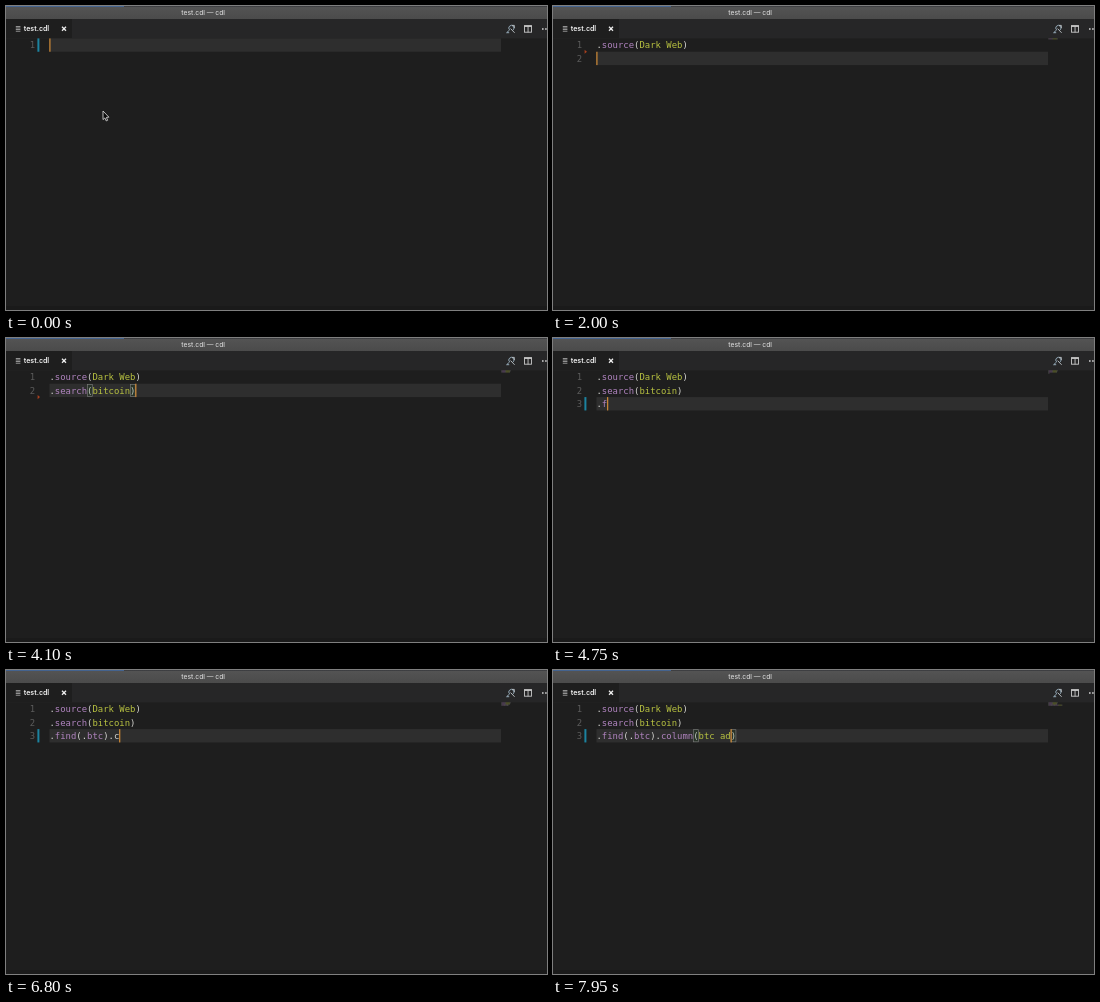
Write an HTML page with a canvas that moves like this. It is 541x304 px and loops after 8000 ms.

```html
<!DOCTYPE html>
<html lang="en">
<head>
<meta charset="utf-8">
<title>test.cdl</title>
<style>
html, body { margin: 0; width: 100%; height: 100%; overflow: hidden; background: #1e1e1e; }
canvas { display: block; width: 541px; height: 304px; }
</style>
</head>
<body>
<canvas id="stage"></canvas>
<script>
const W = 541, H = 304, LOOP = 8000;
const LEFT = 43.5, TOP = 32.4, CHAR = 5.37, LINE = 13.35;
const MONO = '8.92px "DejaVu Sans Mono", monospace';
const UI = 'Inter, sans-serif';
const COLOR = { plain: '#d6d6d2', name: '#b184c0', arg: '#b9c341', caret: '#d08a36' };
const FINISHED = ['.source(Dark Web)', '.search(bitcoin)'];

const canvas = document.getElementById('stage');
const ctx = canvas.getContext('2d');
const ratio = window.devicePixelRatio || 1;
canvas.width = W * ratio;
canvas.height = H * ratio;

const lineTop = row => TOP + row * LINE;
const colX = col => LEFT + col * CHAR;

// Editing steps: each holds the current line and where the caret is.
const steps = [];
const put = (t, row, text, caret = text.length, sel = null) =>
  steps.push({ t, row, text, caret, sel });

function placeholder(t, row, before, word) {
  put(t, row, before + word + ')', before.length, [before.length, before.length + word.length]);
}

function fill(row, before, word, times) {
  times.forEach((t, i) => {
    const typed = before + word.slice(0, i + 1);
    put(t, row, typed + ')', typed.length);
  });
}

const every = (start, gap, count) => Array.from({ length: count }, (_, i) => start + i * gap);

put(-450, 0, '');
put(200, 0, '.');
put(350, 0, '.s');
placeholder(1000, 0, '.source(', 'SourceNames');
fill(0, '.source(', 'Dark Web', every(1150, 70, 8));
put(1750, 0, '.source(Dark Web)');
put(1950, 1, '');
put(2050, 1, '.');
put(2150, 1, '.s');
placeholder(2900, 1, '.search(', 'Query');
fill(1, '.search(', 'bitcoin', every(3100, 90, 7));
put(3850, 1, '.search(bitcoin)');
put(4300, 2, '');
put(4500, 2, '.');
put(4650, 2, '.f');
placeholder(5450, 2, '.find(', 'Pattern');
fill(2, '.find(', '.btc', every(5800, 150, 4));
put(6450, 2, '.find(.btc)');
put(6650, 2, '.find(.btc).');
put(6800, 2, '.find(.btc).c');
placeholder(7100, 2, '.find(.btc).column(', 'Name');
fill(2, '.find(.btc).column(', 'btc ad', [7350, 7450, 7550, 7650, 7750, 7850]);

const marks = [
  { t: 0, row: 0, bar: true },
  { t: 1800, row: 0 },
  { t: 2250, row: 1, bar: true },
  { t: 3900, row: 1 },
  { t: 4650, row: 2, bar: true }
];

// Completion lists; a leading "*" marks a plain word entry.
const S_ITEMS = ['search', 'showDate', 'showRanges', 'source'];
const S_WORDS = ['search', 'showDate', 'showRanges', '*source', 'source'];
const F_ITEMS = ['filter', 'find'];
const SOURCE_DOC = ['Select data source(s).'];
const FILTER_DOC = ['Filter the results by field.', 'Use the field name first,', 'then the value.'];
const COLUMN_DOC = ['Add a column to the results.', 'Use the column name as', 'the argument.'];
const menus = [
  { t: 0 },
  { t: 450, row: 0, col: 2, items: S_ITEMS, sel: 0 },
  { t: 650, row: 0, col: 2, items: S_ITEMS, sel: 1 },
  { t: 700, row: 0, col: 2, items: S_ITEMS, sel: 2 },
  { t: 750, row: 0, col: 2, items: S_ITEMS, sel: 3 },
  { t: 850, row: 0, col: 2, items: S_ITEMS, sel: 3, doc: SOURCE_DOC },
  { t: 1000 },
  { t: 2300, row: 1, col: 2, items: S_WORDS, sel: 0, doc: SOURCE_DOC },
  { t: 2900 },
  { t: 4800, row: 2, col: 2, items: F_ITEMS, sel: 0, doc: FILTER_DOC },
  { t: 5250, row: 2, col: 2, items: F_ITEMS, sel: 1, doc: ['Find a pattern.'] },
  { t: 5450 },
  { t: 6900, row: 2, col: 13, items: ['column', 'count'], sel: 0, doc: COLUMN_DOC },
  { t: 7100 }
];

const latest = (list, t) => list.reduce((found, item) => item.t <= t ? item : found, list[0]);

function rect(x, y, w, h, color) {
  ctx.fillStyle = color;
  ctx.fillRect(x, y, w, h);
}

function outline(x, y, w, h, color, width = 0.7) {
  ctx.strokeStyle = color;
  ctx.lineWidth = width;
  ctx.strokeRect(x, y, w, h);
}

function label(text, x, y, font, color, align = 'left') {
  ctx.font = font;
  ctx.fillStyle = color;
  ctx.textAlign = align;
  ctx.fillText(text, x, y);
}

function stroke(points, color, width) {
  ctx.beginPath();
  points.forEach(([x, y], i) => i ? ctx.lineTo(x, y) : ctx.moveTo(x, y));
  ctx.strokeStyle = color;
  ctx.lineWidth = width;
  ctx.stroke();
}

function cross(x, y, r, color, width) {
  stroke([[x - r, y - r], [x + r, y + r]], color, width);
  stroke([[x + r, y - r], [x - r, y + r]], color, width);
}

function drawFrame() {
  rect(0, 0, W, H, '#1e1e1e');
  const bar = ctx.createLinearGradient(0, 0, 0, 13);
  bar.addColorStop(0, '#545454');
  bar.addColorStop(1, '#4b4b4b');
  rect(0, 0, W, 13, bar);
  rect(0, 0, W, 0.9, '#3b3d40');
  rect(0, 0, 118, 1, '#44638f');
  label('test.cdl — cdl', 175.3, 9.1, '500 6.7px ' + UI, '#d2d2d2');

  rect(0, 13, W, 19.4, '#262627');
  rect(0, 13, 66, 19.4, '#1e1e1e');
  for (let i = 0; i < 4; i++) rect(9.8, 20 + i * 1.6, 4.6, 0.75, '#b9b9b9');
  label('test.cdl', 17.8, 25.2, '600 7px ' + UI, '#f4f4f4');
  cross(58, 22.8, 2, '#f0f0f0', 1.3);

  // Toolbar
  ctx.beginPath();
  ctx.arc(505.4, 22, 2.6, Math.PI * 0.75, Math.PI * 2.3);
  ctx.strokeStyle = '#9fb6c4';
  ctx.lineWidth = 0.9;
  ctx.stroke();
  stroke([[504.6, 22.6], [508.6, 26.8]], '#c2c8cc', 0.9);
  stroke([[503.6, 24], [500.6, 26.7], [503.2, 26.7]], '#9fb6c4', 0.9);
  stroke([[506, 19.4], [508.3, 19.4], [508.3, 22]], '#c2c8cc', 0.9);
  outline(518.5, 19.8, 7, 6.4, '#c8c8c8', 0.9);
  rect(518.1, 19.3, 7.8, 1.6, '#c8c8c8');
  rect(521.6, 20, 0.9, 6.4, '#c8c8c8');
  for (const x of [536, 539.1]) rect(x, 22.2, 1.6, 1.6, '#c8c8c8');
  rect(0, 300, W, 4, '#1a1a1a');
}

function tokens(text) {
  return [...text.matchAll(/(\.)(\w+)|[().]|[^().]+/g)].flatMap(m => {
    if (m[2]) {
      const fresh = m[2] === 'c';
      return [['.', m.index, COLOR.plain], [m[2], m.index + 1, fresh ? COLOR.plain : COLOR.name]];
    }
    return [[m[0], m.index, /[().]/.test(m[0]) ? COLOR.plain : COLOR.arg]];
  });
}

function drawLine(text, row) {
  const y = lineTop(row);
  label(String(row + 1), 29, y + 10, MONO, '#5c5c5c', 'right');
  for (const [part, col, color] of tokens(text)) {
    label(part, colX(col), y + 10, MONO, color);
    ctx.globalAlpha = 0.45;
    rect(495.5 + col * 0.53, 32.5 + row * 1.1, part.length * 0.53, 0.8, color);
    ctx.globalAlpha = 1;
  }
}

function drawBrackets(step) {
  const { text, caret, row } = step;
  const close = text[caret] === ')' ? caret : text[caret - 1] === ')' ? caret - 1 : -1;
  if (close < 0) return;
  for (const col of [text.lastIndexOf('(', close), close]) {
    rect(colX(col), lineTop(row) + 0.4, CHAR, LINE - 1, 'rgba(0,100,0,0.1)');
    outline(colX(col) + 0.3, lineTop(row) + 0.6, CHAR - 0.5, LINE - 1.2, '#808080', 0.6);
  }
}

function drawMark({ row, bar }) {
  if (bar) return rect(31.4, lineTop(row), 2, LINE, '#1c83a0');
  const y = lineTop(row + 1);
  ctx.beginPath();
  ctx.moveTo(31.6, y - 2.1);
  ctx.lineTo(34, y);
  ctx.lineTo(31.6, y + 2.1);
  ctx.fillStyle = '#a8401f';
  ctx.fill();
}

function drawEditor(t) {
  const step = latest(steps, t);
  const { row, text, caret, sel } = step;
  const y = lineTop(row);
  if (sel) {
    rect(colX(sel[0]), y + 0.3, (sel[1] - sel[0]) * CHAR, LINE - 0.6, '#414849');
    rect(colX(text.length), y + 0.3, 0.8, LINE - 0.6, '#777');
  } else {
    rect(LEFT, y, 495 - LEFT, LINE, '#2e2e2e');
  }
  FINISHED.slice(0, row).forEach(drawLine);
  drawLine(text, row);
  if (!sel) {
    drawBrackets(step);
    if ((t - step.t) % 1000 < 500) rect(colX(caret) - 0.2, y, 1.2, LINE, COLOR.caret);
  }
  drawMark(latest(marks, t));
}

function drawItemIcon(x, y, word) {
  if (word) {
    outline(x + 0.2, y + 3.6, 8.3, 6.6, '#c5c5c5', 0.8);
    label('abc', x + 4.35, y + 8.4, '600 4px ' + UI, '#c5c5c5', 'center');
    return;
  }
  rect(x + 0.4, y + 2.7, 8, 1.3, '#d0d0d0');
  rect(x + 0.4, y + 2.7, 0.8, 7.8, '#d0d0d0');
  rect(x + 7.6, y + 2.7, 0.8, 7.8, '#d0d0d0');
  for (let i = 0; i < 4; i++) rect(x + 0.4 + i * 2.3, y + 9.8, 1.1, 0.9, '#d0d0d0');
}

function drawMenu({ row, col, items, sel, doc }) {
  if (!items) return;
  const x = colX(col), y = lineTop(row + 1), w = 184, h = items.length * LINE;
  rect(x, y, w, h, '#2b2b2d');
  items.forEach((item, i) => {
    const top = y + i * LINE;
    if (i === sel) rect(x, top, w, LINE, '#57585a');
    const word = item[0] === '*';
    const name = word ? item.slice(1) : item;
    drawItemIcon(x + 3, top, word);
    label(name[0], x + 14.8, top + 10, MONO, '#e0902f');
    label(name.slice(1), x + 14.8 + CHAR, top + 10, MONO, '#d2d2d2');
  });
  outline(x + 0.25, y + 0.25, w - 0.5, h - 0.5, '#454545', 0.5);
  if (!doc) return;
  const dx = x + w, dh = 23.6 + doc.length * LINE;
  rect(dx, y, w, dh, '#2b2b2d');
  outline(dx + 0.25, y + 0.25, w - 0.5, dh - 0.5, '#454545', 0.5);
  label('cdl', dx + 3.3, y + 12.7, MONO, '#a4a4a4');
  cross(dx + 173.8, y + 7.2, 2, '#c8c8c8', 1);
  doc.forEach((line, i) => label(line, dx + 3.3, y + 30.4 + i * LINE, '8.7px ' + UI, '#d8d8d8'));
}

function drawPointer() {
  const shape = [[97, 105], [97, 113.6], [98.9, 111.9], [100.2, 114.9], [101.6, 114.3],
    [100.4, 111.4], [102.9, 111.2]];
  ctx.beginPath();
  shape.forEach(([x, y]) => ctx.lineTo(x, y));
  ctx.closePath();
  ctx.fillStyle = '#0a0a0a';
  ctx.fill();
  ctx.strokeStyle = '#e4e4e4';
  ctx.lineWidth = 0.8;
  ctx.stroke();
}

function draw(t) {
  ctx.setTransform(ratio, 0, 0, ratio, 0, 0);
  drawFrame();
  drawEditor(t);
  drawMenu(latest(menus, t));
  if (t < 200) drawPointer();
}

const start = performance.now();
function tick() {
  draw((performance.now() - start) % LOOP);
  requestAnimationFrame(tick);
}
tick();
</script>
</body>
</html>
```
